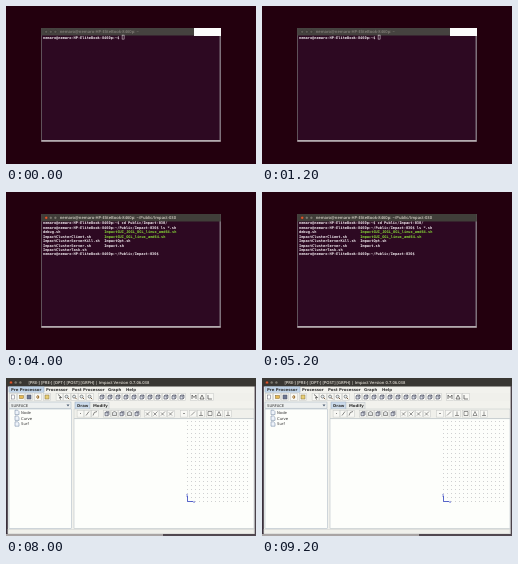
These frames come from a looping animation (250x158 px, 10000 ms). An HTML page:

```html
<!DOCTYPE html>
<html lang="en">
<head>
<meta charset="utf-8">
<title>Terminal session</title>
<style>
html, body { margin: 0; width: 100%; height: 100%; overflow: hidden; background: #23000e; }
svg { display: block; width: 100vw; height: 100vh; }
text { white-space: pre; text-rendering: geometricPrecision; }
.mono { font: bold 3.64px "DejaVu Sans Mono", monospace; }
.title { font: 600 4.1px "Open Sans", sans-serif; }
.ui { font: bold 3.9px "DejaVu Sans", sans-serif; }
.list { font: 3.8px "DejaVu Sans", sans-serif; }
</style>
</head>
<body>
<svg id="stage" viewBox="0 0 250 158"></svg>
<script>
const stage = document.getElementById('stage');
const HOLD = 2000;
const HOST = 'nemaro@nemaro-HP-EliteBook-8460p';
const DIR = '~/Public/Impact-030';
const WHITE = '#f4eef2', GREEN = '#86d838';

function add(parent, tag, attrs, content) {
  const el = document.createElementNS('http://www.w3.org/2000/svg', tag);
  for (const key in attrs) el.setAttribute(key, attrs[key]);
  if (content !== undefined) el.textContent = content;
  parent.appendChild(el);
  return el;
}
const group = () => add(stage, 'g', { visibility: 'hidden' });
const rect = (g, x, y, width, height, fill, stroke = 'none') =>
  add(g, 'rect', { x, y, width, height, fill, stroke, 'stroke-width': 0.5 });
const text = (g, x, y, str, fill, cls) => add(g, 'text', { x, y, fill, class: cls }, str);
const path = (g, d, stroke, width = 0.6, fill = 'none') =>
  add(g, 'path', { d, stroke, 'stroke-width': width, fill });

function buttons(g, x, y, step, active) {
  for (let i = 0; i < 3; i++) {
    add(g, 'circle', {
      cx: x + i * step, cy: y, r: 1.5, stroke: '#292724', 'stroke-width': 0.4,
      fill: active && i === 0 ? '#e2562c' : active ? '#7c7970' : '#615e59'
    });
  }
}

// Each row is a list of [column, string, colour].
function terminal({ x, right, active = true, path: dir, baseline, rows }) {
  const g = group(), top = 22, bottom = 134, width = right - x;
  rect(g, 0, 0, 250, 158, '#23000e');
  rect(g, x, top, width, bottom - top, '#2d0922');
  rect(g, x, top, 0.8, bottom - top, '#6d656b');
  rect(g, right - 1.2, top, 1.2, bottom - top, '#928b92');
  rect(g, x, top, width, 7.5, active ? '#403e39' : '#45423f');
  rect(g, x, bottom, width, 1.8, '#b3aaae');
  buttons(g, x + 5, 25.8, 4.6, active);
  text(g, x + 18.5, 27.2, `${HOST}: ${dir}`, active ? '#d5d0c6' : '#85817b', 'title');
  rows.forEach((row, i) => row.forEach(([col, str, fill = WHITE]) =>
    text(g, x + 1.8 + col * 2.19, baseline + i * 4.43, str, fill, 'mono')));
  return g;
}

const home = `${HOST}:~$ `;
const prompt = `${HOST}:${DIR}$ `;
const cdRow = [[0, home + 'cd Public/Impact-030/']];
const listing = [
  cdRow,
  [[0, prompt + 'ls *.sh']],
  [[0, 'debug.sh'], [28, 'ImpactGUI_JOGL_OGL_linux_amd64.sh', GREEN]],
  [[0, 'ImpactClusterClient.sh'], [28, 'ImpactGUI_OGL_linux_amd64.sh', GREEN]],
  [[0, 'ImpactClusterServerKill.sh'], [28, 'ImpactOpt.sh']],
  [[0, 'ImpactClusterServer.sh'], [28, 'Impact.sh']],
  [[0, 'ImpactClusterTask.sh']]
];

function idleTerminal() {
  const g = terminal({ x: 35.2, right: 214.8, active: false, path: '~', baseline: 32.9, rows: [[[0, home]]] });
  rect(g, 188, 22, 27, 8, '#fcfcfc');
  rect(g, 116.1, 29.1, 2, 4, 'none', WHITE);
  return g;
}
const typedTerminal = () =>
  terminal({ x: 35.2, right: 214.8, path: '~', baseline: 32.9, rows: [cdRow] });
const listedTerminal = () =>
  terminal({ x: 35.2, right: 214.8, path: DIR, baseline: 32.4, rows: [...listing, [[0, prompt]]] });
const launchTerminal = () =>
  terminal({ x: 28.2, right: 222.7, path: DIR, baseline: 32.8,
    rows: [...listing, [[0, prompt + 'sh ImpactGUI_OGL_linux_amd64.sh']]] });

const button = (g, x, y) => rect(g, x - 3.4, y - 3.4, 6.8, 6.8, '#f8f8f4', '#c6c8c5');
function cube(g, x, y) {
  path(g, `M${x - 2} ${y - 1}h3v3h-3zl1-1h3l-1 1m1-1v3l-1 1`, '#45495c', 0.6, '#d8dce4');
}
function magnifier(g, x, y) {
  add(g, 'circle', { cx: x - 0.4, cy: y - 0.4, r: 1.5, fill: '#e4edf0', stroke: '#555', 'stroke-width': 0.6 });
  path(g, `M${x + 0.7} ${y + 0.7}l1.5 1.5`, '#6b4c2d', 0.9);
}

function mainToolbar(g) {
  const y = 19;
  const lenses = [61, 68.5, 76, 84];
  const cubes = Array.from({ length: 11 }, (_, i) => 96 + i * 8);
  rect(g, 2, 14.6, 246, 8.4, '#f0f0eb');
  [7, 15, 23, 32, 41, 53.5, ...lenses, ...cubes, 188, 196, 204].forEach(x => button(g, x, y));
  rect(g, 5.5, 17, 3, 4, '#fff', '#667');
  rect(g, 13.5, 17.5, 4, 3, '#e6b955', '#886a2c');
  rect(g, 21, 17, 4, 4, '#6f7892', '#424a62');
  path(g, `M30 ${y}h3l-1.5-2m1.5 2l-1.5 2`, '#9a6a27', 1);
  rect(g, 39, 17, 4, 4, '#e9cf75', '#7b6a3a');
  path(g, 'M52 16.5l3.5 3h-2l1 2', '#333', 0.7);
  lenses.forEach(x => magnifier(g, x, y));
  cubes.forEach(x => cube(g, x, y));
  path(g, 'M186 21v-4l2 2.5 2-2.5v4M194 21l2-4 2 4zM202 17v4h4', '#444', 0.7);
}

function drawToolbar(g) {
  const y = 35.7;
  const solids = [101, 108.5, 116, 123.5, 131];
  const edits = [142, 149.5, 157, 165];
  rect(g, 68, 31, 180, 9.5, '#f0f0eb', '#c0c5c8');
  [74.5, 81.5, 89, ...solids, ...edits, 178, 187, 195, 204, 213, 222].forEach(x => button(g, x, y));
  path(g, 'M74 35.5h1M80 37.5l3-4M87 37.5q.5-4 4-4', '#555', 0.7);
  solids.forEach((x, i) => i % 2
    ? path(g, `M${x - 2} 37.5v-3l2-1 2 1v3z`, '#555', 0.6, '#e2e4e4')
    : cube(g, x, y));
  edits.forEach(x => path(g, `M${x - 2} 37.5l4-4m-4 1l3 3`, '#555'));
  path(g, 'M177 35.5h2M185 37.5l4-4M195 33.5v4m-2 0h4M202 33.5h4v4h-4zM211 37.5l2-4 2 4zM220 37.5h4m-2 0v-4', '#555');
}

function application() {
  const g = group();
  rect(g, 0, 0, 250, 158, '#f2f2ed');
  rect(g, 0, 0, 250, 8.5, '#393733');
  rect(g, 0, 8, 1.8, 150, '#3a303c');
  rect(g, 248.6, 8, 1.4, 150, '#4b434b');
  buttons(g, 5, 4.4, 4.7, true);
  text(g, 22.5, 5.8, '[PRE-] [PRE-] [OPT-] [POST] [GRPH] | Impact Version 0.7.06.038', '#dedad1', 'title');

  rect(g, 3, 8.8, 35, 5.8, '#c3d6ea', '#8aa2bd');
  [['Pre Processor', 5], ['Processor', 40], ['Post Processor', 66], ['Graph', 102], ['Help', 120]]
    .forEach(([label, x]) => text(g, x, 13.1, label, '#333', 'ui'));
  mainToolbar(g);

  rect(g, 3, 24, 62, 6.2, '#ecefef', '#a3b2c0');
  text(g, 5, 28.5, 'SURFACE', '#333', 'list');
  path(g, 'M60.5 26.5h3l-1.5 2z', 'none', 0, '#4c5c70');
  rect(g, 3, 31, 62.5, 119.5, '#fdfefb', '#a3b2c0');
  ['Node', 'Curve', 'Surf'].forEach((label, i) => {
    const y = 33 + i * 5.8;
    path(g, `M9 ${y - 0.8}h2.6l1.4 1.4v3h-4z`, '#657b99', 0.5, '#eef3fa');
    text(g, 15, y + 2.7, label, '#333', 'list');
  });

  rect(g, 69, 24, 15, 7, '#cddcec', '#94a8bf');
  rect(g, 84, 24.5, 19, 6.5, '#eaece9', '#b8c0c6');
  text(g, 71, 28.7, 'Draw', '#333', 'ui');
  text(g, 87, 28.7, 'Modify', '#333', 'ui');
  drawToolbar(g);

  rect(g, 68, 40.8, 180, 109.7, '#fdfefb', '#b0b9c0');
  for (let y = 43.5; y < 124; y += 4)
    for (let x = 181.5; x < 244; x += 4) rect(g, x - 0.35, y - 0.35, 0.7, 0.7, '#a0a2a6');
  path(g, 'M181.5 118v5.5h5.5', '#2f3fc0', 0.8);
  text(g, 180, 117.6, 'y', '#2f3fc0', 'list');
  text(g, 187, 125, 'x', '#2f3fc0', 'list');
  rect(g, 2, 151.5, 246, 4, '#f0f0eb', '#cfd2d0');
  rect(g, 0, 156, 157, 2, '#a9a4a4');
  rect(g, 157, 156, 93, 2, '#514850');
  return g;
}

const scenes = [idleTerminal(), typedTerminal(), listedTerminal(), launchTerminal(), application()];

function render(time) {
  const current = Math.floor(time / HOLD) % scenes.length;
  scenes.forEach((g, i) => g.setAttribute('visibility', i === current ? 'visible' : 'hidden'));
}

const start = performance.now();
function tick() {
  render(performance.now() - start);
  requestAnimationFrame(tick);
}
tick();
</script>
</body>
</html>
```
